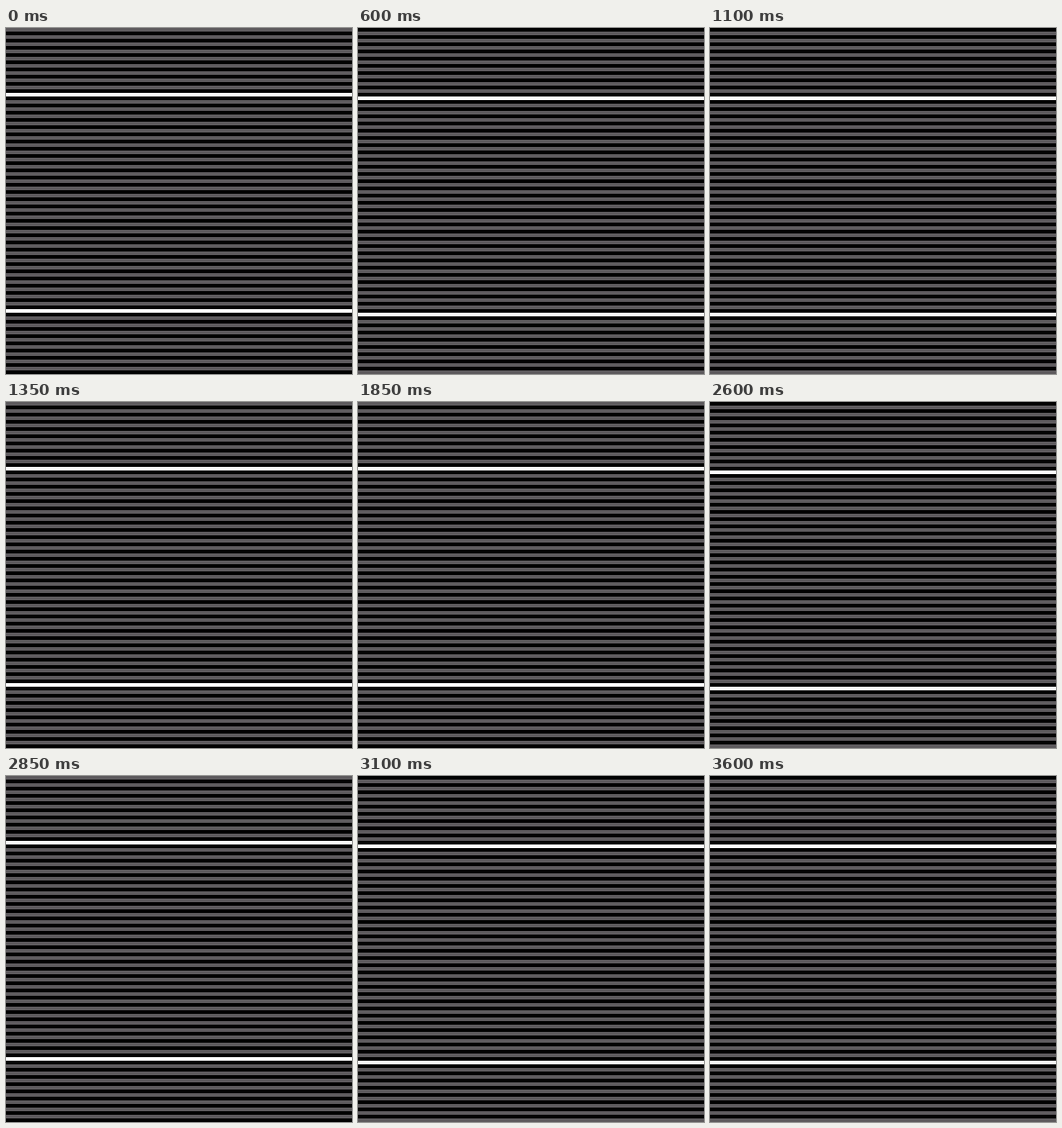
An HTML page that plays this animation: 384x384 px, repeating every 3.85 s.

```html
<!DOCTYPE html>
<html lang="en">
<head>
<meta charset="utf-8">
<title>Scan lines</title>
<style>
  html, body {
    margin: 0;
    width: 100%;
    height: 100%;
    overflow: hidden;
    background: #000;
  }

  .lines {
    --pitch: 8px;
    --line: 4px;
    position: absolute;
    left: 0;
    top: 0;
    width: 384px;
    height: 384px;
    background: repeating-linear-gradient(#5e5b5e 0 var(--line), #000 var(--line) var(--pitch));
  }

  .lines.low { top: var(--line); }

  .lines::before,
  .lines::after {
    content: "";
    position: absolute;
    left: 0;
    width: 100%;
    height: var(--line);
    background: #fff;
  }

  .lines::before { top: calc(9 * var(--pitch)); }
  .lines::after { top: calc(39 * var(--pitch)); }
</style>
</head>
<body>
<div class="lines"></div>
<script>
  const LOOP = 3850;
  const BEAT = 250;
  const FIRST = 100; // the first hold of each loop is shorter
  const lines = document.querySelector(".lines");

  function draw() {
    const t = performance.now() % LOOP;
    const beat = Math.floor((t + BEAT - FIRST) / BEAT);
    lines.classList.toggle("low", beat % 2 === 1);
    requestAnimationFrame(draw);
  }
  draw();
</script>
</body>
</html>
```
